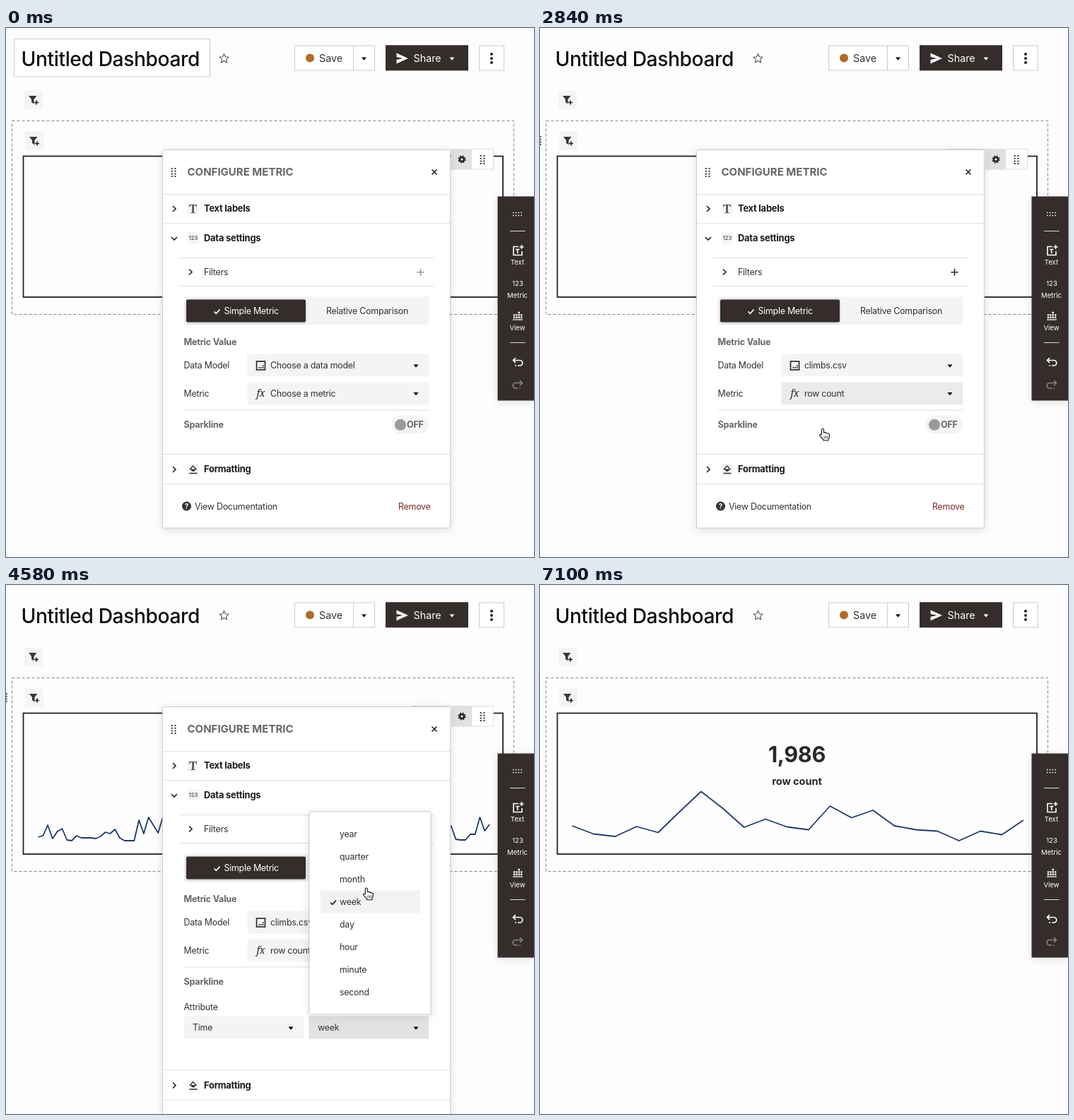
Recreate the animation shown at these times as an HTML page. Size 747x749 px, loop 7.52 s.

```html
<!DOCTYPE html>
<html lang="en">
<head>
<meta charset="utf-8">
<title>Configure metric</title>
<style>
html, body { margin: 0; width: 100%; height: 100%; overflow: hidden; background: #fdfdfd; }
svg { display: block; width: 747px; height: 749px; }
text { font: 430 12.4px Inter, sans-serif; font-optical-sizing: none; letter-spacing: -.24px; fill: #333131; }
.bold { font-size: 12.9px; font-weight: 700; letter-spacing: -.22px; fill: #1c1a1a; }
.soft { font-size: 12.6px; font-weight: 700; fill: #666; }
.button { font-size: 14.3px; letter-spacing: 0; }
.tiny { font-size: 9.6px; letter-spacing: 0; fill: #fff; text-anchor: middle; }
.white { fill: #fff; }
.line { fill: none; stroke: #252020; stroke-width: 1.6; }
.rule { stroke: #dedede; }
.field { fill: #f4f4f4; }
.box { fill: #fff; stroke: #ccc; }
.dark { fill: #352c2c; }
.chart { fill: none; stroke: #1f3a68; stroke-width: 1.8; stroke-linejoin: round; }
.shadow { filter: drop-shadow(0 2px 6px #00000020); }
</style>
</head>
<body>
<svg viewBox="0 0 747 749">
  <defs>
    <path id="caret" d="M-3.5-2h7L0 2.2z"/>
    <path id="chevron" class="line" d="M-2-4L2 0L-2 4"/>
    <path id="check" fill="none" stroke-width="1.7" d="M-4 0L-1.2 2.8L4-2.8"/>
    <g id="filter">
      <rect class="field" x="-13" y="-13" width="26" height="26"/>
      <path fill="#3a3535" d="M-7-5.5H4.5L.5-.5V6L-3 3.5V-.5z"/>
      <path class="line" d="M1 4H7M4 1V7"/>
    </g>
    <g id="grip" fill="#333"></g>
    <g id="modelIcon">
      <rect class="line" x="-6" y="-6" width="12" height="12"/>
      <path fill="#252020" d="M-3 2h1.7v1.7H-3zM-.2 2h1.7v1.7H-.2zM2.4 2h1.7v1.7H2.4zM2.4-.8h1.7V.9H2.4z"/>
    </g>
    <path id="undo" fill="none" stroke-width="1.7" d="M-3-6L-6.5-2.5L-3 1M-6-2.5H3A3.7 3.7 0 0 1 3 5H0M-4 5h2"/>
  </defs>

  <!-- page header -->
  <rect id="titleBox" class="box" x="11.5" y="15.5" width="277" height="53.5"/>
  <text x="21.5" y="53.5" style="font-size:28.2px;font-weight:450;letter-spacing:-.4px;fill:#111">Untitled Dashboard</text>
  <path fill="none" stroke="#555" stroke-width="1.1" stroke-linejoin="round" d="M308.5 36.5l1.9 4.2 4.6.5-3.4 3.1.9 4.6-4-2.3-4 2.3.9-4.6-3.4-3.1 4.6-.5z"/>
  <rect class="box" x="408.5" y="25" width="113" height="35"/>
  <path stroke="#ccc" d="M491.5 25v35"/>
  <circle cx="430" cy="42.5" r="6" fill="#b26a28"/>
  <text class="button" x="443" y="48">Save</text>
  <use href="#caret" x="506.5" y="43.5"/>
  <rect class="dark" x="537" y="24.3" width="117" height="36"/>
  <path fill="#fff" d="M552.5 35.5L569 43L552.5 50.5V45L561.5 43L552.5 41z"/>
  <text class="button white" x="576.5" y="48">Share</text>
  <use href="#caret" x="631" y="43.5" fill="#fff"/>
  <rect class="box" x="669.5" y="25" width="35" height="35"/>
  <g fill="#252020"><circle cx="687" cy="37" r="2"/><circle cx="687" cy="43" r="2"/><circle cx="687" cy="49" r="2"/></g>

  <!-- widget -->
  <use href="#filter" x="39" y="101.5"/>
  <rect x="8.5" y="131.5" width="710" height="274" fill="none" stroke="#858585" stroke-dasharray="4 3"/>
  <use href="#filter" x="40" y="159.5"/>
  <rect x="24.5" y="181.5" width="678.5" height="199.5" fill="#fefefe" stroke="#252122" stroke-width="1.8"/>
  <g id="value" text-anchor="middle">
    <text class="bold" x="363.5" y="251" style="font-size:30.7px;letter-spacing:-.4px;fill:#2d2828">1,986</text>
    <text class="bold" x="363.5" y="283" style="font-size:14.6px;letter-spacing:-.1px;fill:#2d2828">row count</text>
  </g>
  <g id="weekly" class="chart"></g>
  <g id="monthly" class="chart"></g>
  <use id="handle" href="#grip" x="-2" y="159.5"/>
  <g id="toolbar">
    <rect id="toolbarBox" y="171.5" height="28.5" fill="#fff" stroke="#ddd"/>
    <rect x="630" y="171" width="29" height="29" fill="#e1e1e4"/>
    <circle cx="645" cy="186" r="4.6" fill="none" stroke="#252020" stroke-width="2" stroke-dasharray="2 1.61"/>
    <circle cx="645" cy="186" r="2.9" fill="none" stroke="#252020" stroke-width="2.3"/>
    <use href="#grip" x="674" y="186.5"/>
  </g>

  <!-- configuration panel -->
  <g id="panel">
    <rect id="panelBox" class="box shadow" x="221.5" y="172.5" width="407" height="535.5" rx="2"/>
    <use href="#grip" x="237" y="204.5"/>
    <text class="soft" x="256.5" y="209.3" style="font-size:15px;letter-spacing:0">CONFIGURE METRIC</text>
    <rect id="closeHover" x="590" y="188" width="32" height="32" fill="#e1e1e4"/>
    <path class="line" d="M602.5 200.5l7 7m0-7l-7 7"/>
    <path class="rule" d="M222 235.5H628M222 276.5H628M245 325.5H605.5M245 365.5H605.5M252 541H598"/>
    <use href="#chevron" x="238" y="256"/>
    <rect class="field" x="257" y="248" width="15" height="16"/>
    <text x="264.5" y="262" text-anchor="middle" style="font:bold 17px 'Noto Serif',serif;fill:#555">T</text>
    <text class="bold" x="280" y="260.3">Text labels</text>
    <use href="#chevron" transform="translate(238 298) rotate(90)"/>
    <rect class="field" x="257" y="289" width="16" height="16"/>
    <text class="soft" x="265" y="300" text-anchor="middle" style="font-size:7.5px;letter-spacing:0">123</text>
    <text class="bold" x="280" y="301.5">Data settings</text>
    <use href="#chevron" x="261" y="345.5"/>
    <text x="280" y="350">Filters</text>
    <path id="plus" d="M581.5 345.7h10m-5-5v10" stroke-width="1.5"/>
    <rect class="field" x="251.5" y="380.5" width="346.5" height="39.5" rx="2"/>
    <rect class="dark" x="255" y="384.5" width="169" height="32" rx="2" style="filter:drop-shadow(0 1px 2px #0003)"/>
    <use href="#check" x="298.5" y="401.5" stroke="#fff"/>
    <text class="white" x="308.5" y="405.3">Simple Metric</text>
    <text x="453" y="405.3">Relative Comparison</text>
    <text class="soft" x="251.5" y="449">Metric Value</text>
    <text x="251.5" y="482">Data Model</text>
    <rect id="modelField" x="341.5" y="461.5" width="256.5" height="32" rx="1"/>
    <use href="#modelIcon" x="360.5" y="478"/>
    <text id="modelText" x="374" y="482.3"></text>
    <use href="#caret" x="580" y="478.5"/>
    <text x="251.5" y="521.5">Metric</text>
    <rect id="metricField" x="341.5" y="501.5" width="256.5" height="32" rx="1"/>
    <text x="354.5" y="522" style="font:italic 500 14px 'Noto Serif',serif;fill:#252020">fx</text>
    <text id="metricText" x="374" y="522"></text>
    <use href="#caret" x="580" y="518"/>
    <text class="soft" x="251.5" y="565.5">Sparkline</text>
    <rect id="togglePill" x="545" y="548.5" width="53" height="26" rx="13"/>
    <text id="onText" class="bold" x="551" y="566">ON</text>
    <text id="offText" class="soft" x="567" y="566">OFF</text>
    <circle id="knob" cy="561.8" r="8"/>
    <g id="sparkFields">
      <text x="251.5" y="602.3">Attribute</text>
      <text x="428.5" y="602.3">Granularity</text>
      <rect class="field" x="251.5" y="610.5" width="169.5" height="32" rx="1"/>
      <text x="264" y="631.3">Time</text>
      <use href="#caret" x="403" y="627.5"/>
      <rect id="grainField" x="428.5" y="610.5" width="169.5" height="32" rx="1"/>
      <text id="grainText" x="441" y="631.3"></text>
      <use href="#caret" x="580" y="627.5"/>
    </g>
    <g id="footer">
      <path class="rule" d="M222 603.5H628M222 645.5H628"/>
      <use href="#chevron" x="238" y="625"/>
      <rect class="field" x="257" y="617" width="16" height="16"/>
      <path fill="none" stroke="#333" stroke-width="1.3" d="M260.5 624.5l4-4.5 4.5 4.5-4 3zM259.5 630.5h11"/>
      <path fill="#333" d="M260.5 624.5h8.5l-4 3z"/>
      <text class="bold" x="280" y="629.3">Formatting</text>
      <circle cx="255.5" cy="677" r="6.5" fill="#333"/>
      <text class="white" x="255.5" y="680.7" text-anchor="middle" style="font-size:10px;font-weight:700;letter-spacing:0">?</text>
      <text x="267" y="681.5">View Documentation</text>
      <text x="555" y="681.5" style="fill:#7a2823">Remove</text>
    </g>
  </g>

  <!-- side palette -->
  <rect class="dark shadow" x="695.5" y="238.5" width="53" height="289"/>
  <path stroke="#fff" stroke-width="1.6" stroke-dasharray="1.6 2.2" d="M717 261.5h14M717 265.5h14"/>
  <path stroke="#ddd" d="M713 287.5h21.5M713 445.5h21.5"/>
  <path fill="none" stroke="#fff" stroke-width="1.6" d="M725 309.5H718V321.5H730V316M721 313.5h5.5M723.7 313.5V319M729.5 307v6M726.5 310h6"/>
  <text class="tiny" x="723.5" y="335.3">Text</text>
  <text class="tiny" x="724" y="364.5">123</text>
  <text class="tiny" x="723.5" y="381.5">Metric</text>
  <path stroke="#fff" stroke-width="2.4" stroke-dasharray="2.4 1" d="M719 411v-5.8M722.4 411v-5.8M725.8 411v-9.2M729.2 411v-5.8"/>
  <path stroke="#fff" stroke-width="1.3" d="M717 413h14"/>
  <text class="tiny" x="723.5" y="427.7">View</text>
  <use href="#undo" x="724" y="473" stroke="#fff"/>
  <use href="#undo" transform="translate(724 505) scale(-1 1)" stroke="#8b8484"/>

  <g id="modelMenu"></g>
  <g id="metricMenu"></g>
  <g id="grainMenu"></g>

  <g id="cursor" stroke-linejoin="round">
    <path id="arrow" fill="#111" stroke="#fff" stroke-width="1.2" d="M0 0V15.5L3.6 12.2L6 17.8L8.6 16.7L6.2 11.2H11z"/>
    <g id="hand" stroke="#111" stroke-width="1.1">
      <path fill="#fff" d="M-1.5 8V1Q-1.5-.7 0-.7T1.5 1V5Q3.8 4 4.6 5.6Q6.6 5 7.3 6.6Q9.6 6 9.6 8.6L9.4 11Q9 13 8 14.5V16H1V15Q-1.5 12.5-4.4 8.8Q-4.2 6.6-1.5 8z"/>
      <path d="M2.2 9.5v4M4.5 9.5v4M6.8 9.5v4" stroke-width=".8"/>
    </g>
  </g>
</svg>
<script>
const LOOP = 7520;
const $ = id => document.getElementById(id);
const ramp = (t, a, b) => Math.min(1, Math.max(0, (t - a) / (b - a)));
const ease = u => u * u * (3 - 2 * u);
const between = (t, a, b) => t >= a && t < b;
const pulse = (t, a, b, d = 120) => ramp(t, a, a + d) * (1 - ramp(t, b, b + d));
const set = (id, name, value) => $(id).setAttribute(name, value);
const fade = (id, value) => set(id, 'opacity', value);
const write = (id, text) => { if ($(id).textContent !== text) $(id).textContent = text; };
const shade = u => { const v = Math.round(244 - 18 * u); return `rgb(${v},${v},${v + Math.round(2 * u)})`; };

$('grip').innerHTML = [0, 1, 2, 3].map(i =>
  `<path d="M-3.3 ${i * 3.7 - 6.5}h2v2h-2zM1.5 ${i * 3.7 - 6.5}h2v2h-2z"/>`).join('');

const polyline = (x, step, ys) => `<polyline points="${ys.map((y, i) => `${x + i * step},${y}`).join(' ')}"/>`;
// The middle of the weekly line stays covered by the panel.
$('weekly').innerHTML =
  polyline(45.5, 6.79, [357, 355, 340, 359, 349, 345, 361, 362, 355, 358, 358, 358, 359, 356,
    350, 352, 346, 358, 362, 362, 362, 333, 352, 329, 340, 351, 328]) +
  polyline(622.9, 6.79, [345, 341, 360, 361, 361, 353, 353, 329, 348, 339]);
$('monthly').innerHTML = polyline(45.5, 30.4, [341, 352.5, 356, 342, 350.5, 321, 292.5, 316, 343, 331.5, 342.5,
  346.5, 313, 329.5, 319, 341, 346.5, 348.5, 362, 348.5, 353.5, 333]);

function buildMenu(id, x, y, width, items, checked) {
  const rows = items.map((item, i) => {
    const top = y + 15.5 + i * 32;
    return `<rect class="row" x="${x + 16}" y="${top}" width="${width - 31}" height="32" fill="#f2f2f2"
      opacity="${item === checked ? 1 : 0}"/>
      ${item === checked ? `<use href="#check" x="${x + 34}" y="${top + 17}" stroke="#252020"/>` : ''}
      <text x="${x + 43}" y="${top + 20.5}">${item}</text>`;
  });
  $(id).innerHTML = `<rect class="box shadow" x="${x}" y="${y}" width="${width}"
    height="${items.length * 32 + 31}" rx="1"/>${rows.join('')}`;
}
buildMenu('modelMenu', 342, 496.5, 256, ['climbs.csv']);
buildMenu('metricMenu', 342, 536.5, 256, ['row count']);
buildMenu('grainMenu', 429, 321, 172,
  ['year', 'quarter', 'month', 'week', 'day', 'hour', 'minute', 'second'], 'week');
const hoverRow = (menu, index, value) =>
  $(menu).querySelectorAll('.row')[index].setAttribute('opacity', value);

// Pointer tip: time, x, y
const path = [
  [60, 200, 55], [700, 379, 474], [1040, 379, 474], [1460, 394, 526], [2520, 394, 526],
  [2720, 400, 568], [2900, 400, 568], [3240, 567, 563], [3580, 567, 563], [3980, 540, 628],
  [4240, 540, 628], [4560, 510, 430], [4760, 505, 421], [4900, 505, 421], [5540, 594, 212],
  [5760, 594, 212], [6020, 600, 520], [6820, 600, 520], [7100, 590, 760]
];
function pointerAt(t) {
  const next = path.findIndex(p => p[0] > t);
  if (next < 1) return path[next < 0 ? path.length - 1 : 0].slice(1);
  const [a, b] = [path[next - 1], path[next]];
  const u = ease(ramp(t, a[0], b[0]));
  return [a[1] + (b[1] - a[1]) * u, a[2] + (b[2] - a[2]) * u];
}
const handTimes = [[640, 2960], [3140, 3720], [3860, 4980], [5400, 5780]];

function draw(t) {
  fade('titleBox', 1 - ramp(t, 60, 160));
  fade('handle', +between(t, 300, 5960));
  fade('toolbar', 1 - ramp(t, 5900, 5980));
  const toolbarLeft = t < 2780 ? 630 : 575;
  set('toolbarBox', 'x', toolbarLeft);
  set('toolbarBox', 'width', 689.5 - toolbarLeft);
  fade('value', +(t >= 2820));
  fade('weekly', ramp(t, 3460, 3700) * (1 - ramp(t, 4940, 5060)));
  fade('monthly', ramp(t, 4940, 5060));

  const expanded = t >= 3380;
  fade('panel', 1 - ramp(t, 5740, 5840));
  set('panelBox', 'height', expanded ? 619 : 535.5);
  set('footer', 'transform', `translate(0 ${expanded ? 83.5 : 0})`);
  fade('sparkFields', +expanded);
  fade('closeHover', pulse(t, 5460, 5800));
  set('plus', 'stroke', t < 1780 ? '#999' : '#252020');

  write('modelText', t < 1780 ? 'Choose a data model' : 'climbs.csv');
  write('metricText', t < 2780 ? 'Choose a metric' : 'row count');
  write('grainText', t < 4820 ? 'week' : 'month');
  set('modelField', 'fill', shade(pulse(t, 620, 1760)));
  set('metricField', 'fill', shade(pulse(t, 2000, 2780)));
  set('grainField', 'fill', shade(pulse(t, 3860, 4800)));

  const on = ease(ramp(t, 3370, 3540));
  set('togglePill', 'fill', shade(pulse(t, 3150, 3680)));
  set('knob', 'cx', 558 + 27.5 * on);
  set('knob', 'fill', on > 0 ? '#352c2c' : '#9a9a9a');
  fade('onText', on);
  fade('offText', 1 - on);

  fade('modelMenu', pulse(t, 820, 1760, 80));
  fade('metricMenu', pulse(t, 2300, 2760, 80));
  fade('grainMenu', pulse(t, 4060, 4800, 80));
  hoverRow('modelMenu', 0, ramp(t, 1260, 1360));
  hoverRow('metricMenu', 0, ramp(t, 2620, 2700));
  hoverRow('grainMenu', 2, ramp(t, 4620, 4720));

  const hand = handTimes.some(([a, b]) => between(t, a, b));
  fade('cursor', +between(t, 61, 7100));
  fade('hand', +hand);
  fade('arrow', +!hand);
  set('cursor', 'transform', `translate(${pointerAt(t)})`);
}

const start = performance.now();
function tick() {
  draw((performance.now() - start) % LOOP);
  requestAnimationFrame(tick);
}
tick();
</script>
</body>
</html>
```
